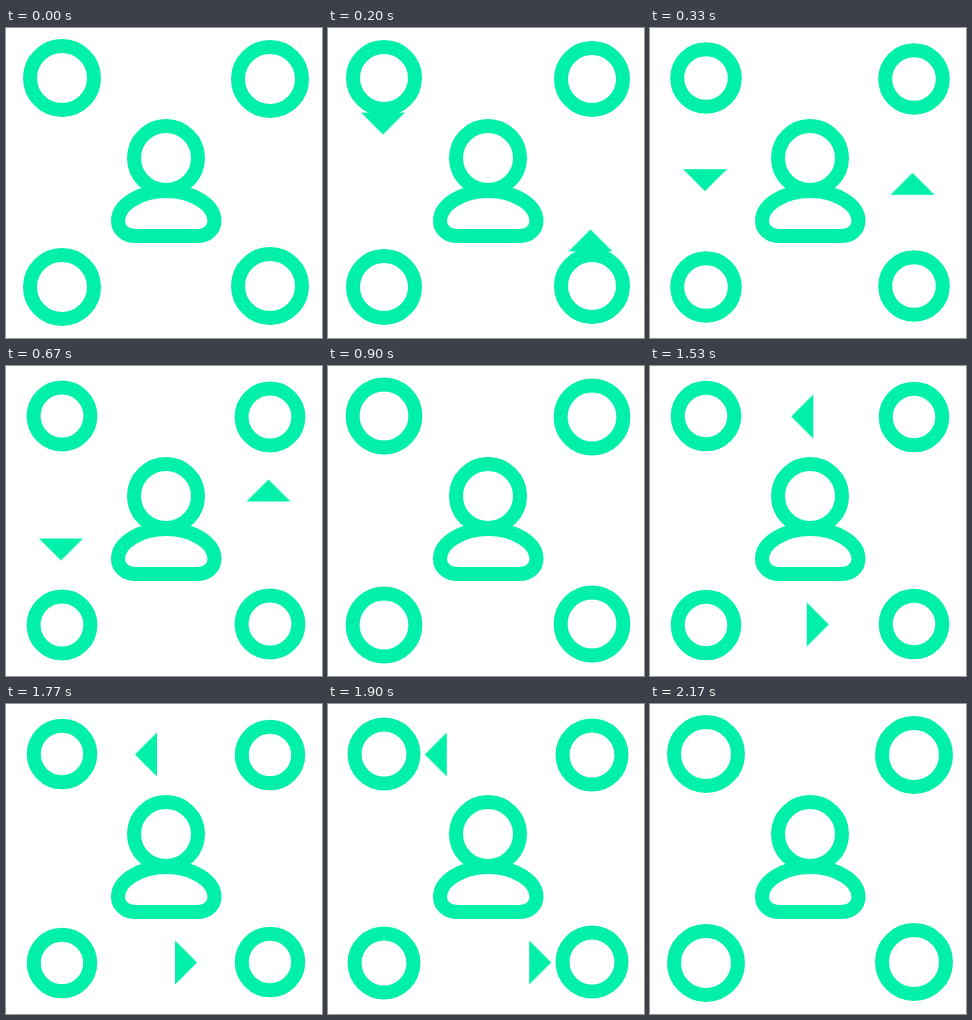
Write an HTML page that moves like this. It is 316 px wide and 310 px high and loops after 2.21 s.

```html
<!DOCTYPE html>
<html lang="en">
<head>
<meta charset="utf-8">
<title>Exchange around a person</title>
<style>
  html, body { margin: 0; width: 100%; height: 100%; overflow: hidden; background: #fff; }
  svg { display: block; width: 316px; height: 310px; }
  .line { fill: #fff; stroke: #00f0aa; stroke-width: 14; }
  .arrow { fill: #00f0aa; }

  .ring, .arrow {
    animation: 2210ms cubic-bezier(.6, 0, .4, 1) infinite;
  }
  .ring { r: 32px; animation-name: pulse; }
  .first { animation-name: first; }
  .second { animation-name: second; }

  @keyframes pulse {
    0%, 49.1%, 50.23%, 100% { r: 32px; }
    23.3%, 74.89% { r: 28px; }
  }
  /* Arrows rest halfway, then slip under the next ring. */
  @keyframes first {
    0% { transform: translateX(19px); }
    23.3% { transform: translateX(123px); }
    49.1%, 100% { transform: translateX(227px); }
  }
  @keyframes second {
    0%, 50.23% { transform: translateX(14.5px); }
    74.89% { transform: translateX(118.5px); }
    100% { transform: translateX(222.5px); }
  }
</style>
</head>
<body>
<svg viewBox="0 0 316 310">
  <g transform="translate(55 50) rotate(90)"><path class="arrow first" d="M-11-22 11 0-11 22z"/></g>
  <g transform="translate(262.5 258) rotate(-90)"><path class="arrow first" d="M-11-22 11 0-11 22z"/></g>
  <g transform="translate(56 258.5)"><path class="arrow second" d="M-11-22 11 0-11 22z"/></g>
  <g transform="translate(264 50.5) rotate(180)"><path class="arrow second" d="M-11-22 11 0-11 22z"/></g>

  <circle class="line ring" cx="56" cy="50" r="32"/>
  <circle class="line ring" cx="264" cy="51" r="32"/>
  <circle class="line ring" cx="56" cy="259" r="32"/>
  <circle class="line ring" cx="264" cy="258" r="32"/>

  <path class="line" d="M130 208H191C202 208 208.500 201 208.500 193C208.500 177 187 163 160.300 163S112 177 112 193C112 201 118.500 208 130 208Z"/>
  <circle class="line" cx="160" cy="130" r="32"/>
</svg>
</body>
</html>
```
